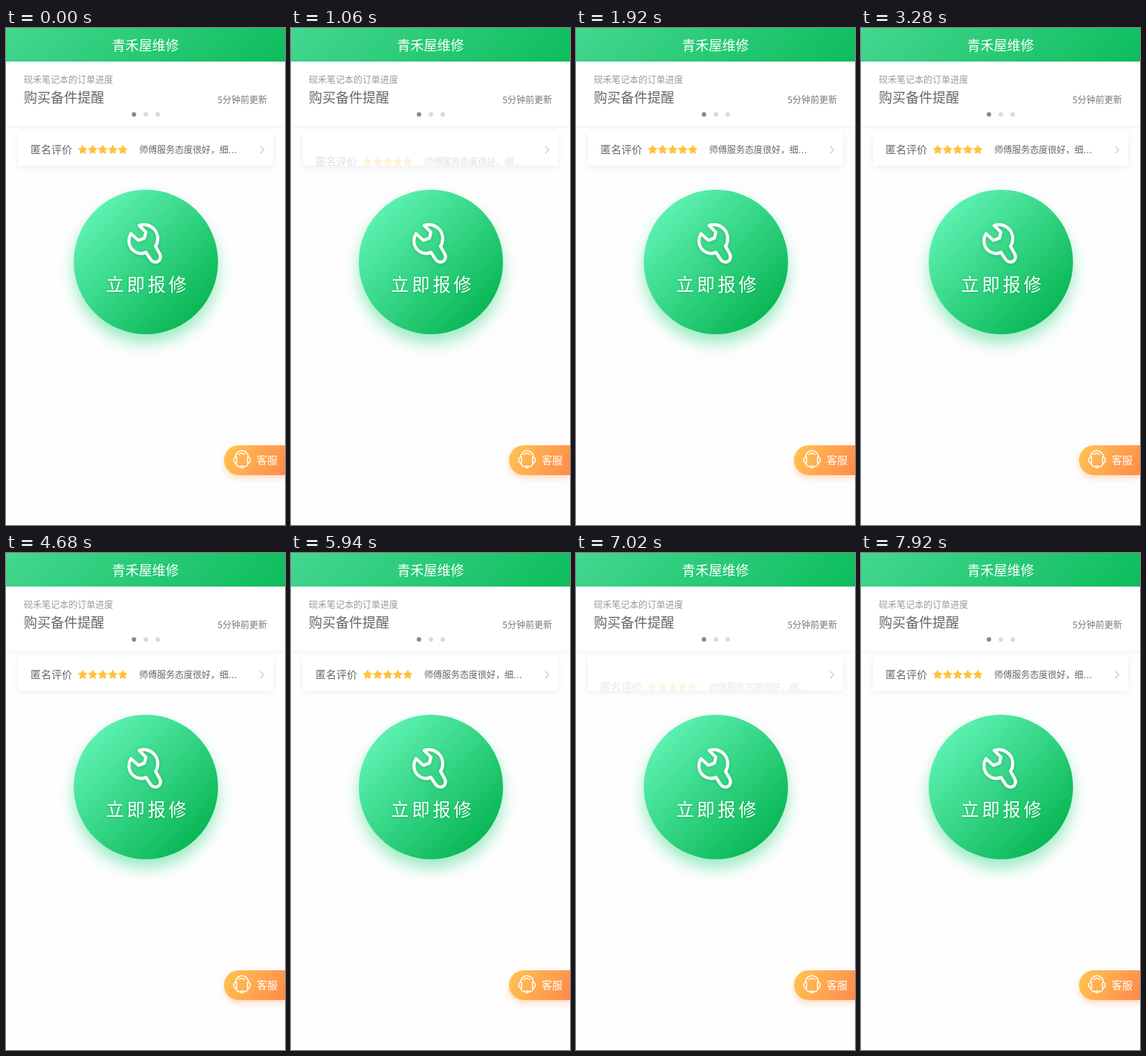
An HTML page that plays this animation: 375x667 px, repeating every 7.94 s.

```html
<!DOCTYPE html>
<html lang="zh-CN">
<head>
<meta charset="utf-8">
<style>
html, body { margin: 0; width: 100%; height: 100%; overflow: hidden; background: #fefefe; }
body { position: relative; font-family: "Noto Sans CJK SC", "Noto Sans CJK", sans-serif; }
body * { position: absolute; }
#stage { left: 0; top: 0; width: 375px; height: 667px; overflow: hidden; }
/* text is placed by the vertical centre of its glyphs */
.t { line-height: 1em; margin-top: -.556em; white-space: nowrap; }
.header { left: 0; top: 0; width: 375px; height: 45px; background: linear-gradient(135deg, #44d790, #0dbd5c); }
.title { left: 0; width: 375px; top: 22.5px; text-align: center; font-size: 18px; font-weight: 500; color: #fff; }
.order { left: 0; top: 45px; width: 375px; height: 86px; background: #fff; box-shadow: 0 1px 6px rgba(0,0,0,.07); }
.dot { top: 113px; width: 6px; height: 6px; border-radius: 50%; background: #d9d9d9; }
.dot.on { background: #888; }
.review { left: 16px; top: 138px; width: 343px; height: 47px; background: #fff; overflow: hidden; border-radius: 2px; }
.lift { left: 16px; top: 138px; width: 343px; height: 47px; border-radius: 2px; box-shadow: 0 2px 8px rgba(0,0,0,.07); }
.item { left: 0; top: 0; width: 320px; height: 47px; }
.more { position: static; letter-spacing: .7px; }
.repair { left: 91px; top: 217px; width: 194px; height: 194px; border-radius: 50%;
  background: linear-gradient(135deg, #5ff3b4 12%, #07b552 88%);
  box-shadow: 0 12px 20px rgba(60,218,140,.5); }
.call { left: 134.5px; top: 344.5px; font-size: 24px; letter-spacing: 4px; color: #fff; text-shadow: 0 1px 3px rgba(0,90,40,.25); }
.help { left: 293px; top: 560px; width: 82px; height: 40px; border-radius: 20px 0 0 20px;
  background: linear-gradient(120deg, #ffc552, #ff8a4c); box-shadow: 0 4px 8px rgba(255,150,80,.35); }
svg { left: 0; top: 0; fill: none; stroke-linecap: round; stroke-linejoin: round; }
.wrench { filter: drop-shadow(0 1px 2px rgba(0,100,50,.25)); }
</style>
</head>
<body>
<div id="stage">
  <div class="header"></div>
  <div class="t title">青禾屋维修</div>

  <div class="order"></div>
  <div class="t" style="left:24px;top:70px;font-size:12px;color:#999">砚禾笔记本的订单进度</div>
  <div class="t" style="left:24px;top:93px;font-size:18px;color:#666">购买备件提醒</div>
  <div class="t" style="right:24px;top:97px;font-size:12px;color:#777">5分钟前更新</div>
  <i class="dot on" style="left:169px"></i>
  <i class="dot" style="left:185px"></i>
  <i class="dot" style="left:201px"></i>

  <div class="lift"></div>
  <div class="review">
    <div class="item" id="item">
      <div class="t" style="left:17px;top:25px;font-size:14px;color:#666">匿名评价</div>
      <svg id="stars" width="160" height="47" fill="#ffc23d" stroke="#ffc23d"></svg>
      <div class="t" style="left:163px;top:25.5px;font-size:12px;color:#666">师傅服务态度很好，细<span class="more">...</span></div>
    </div>
    <svg width="343" height="47" stroke="#aaa" stroke-width="1"><path d="M326 21l4.5 4.5-4.5 4.5"/></svg>
  </div>

  <div class="repair"></div>
  <div class="t call">立即报修</div>

  <div class="help"></div>
  <div class="t" style="left:337px;top:580px;font-size:14px;font-weight:500;color:#fff">客服</div>

  <svg width="375" height="667" stroke="#fff">
    <path class="wrench" stroke-width="4.2" d="M179 265L188 274 186 282 178 285 168 276C163 284 165 295 173 300C178 303 184 303 188 301L194 310C197 315 203 315 206 312C208 309 208 305 206 302L201 293C205 287 205 277 200 271C195 265 187 262 179 265Z"/>
    <g stroke-width="1.5">
      <path d="M308.5 576a8.7 8.7 0 0 1 17.4 0M308.5 584c1 3 3.5 4.7 6.5 5M326 584c-1 3-3.5 4.7-6.5 5"/>
      <path d="M309.8 576v8c-5 .5-5-8.5 0-8zM324.6 576v8c5 .5 5-8.5 0-8z"/>
      <path d="M313 572.5c2.5-2.2 5.5-2.2 8 0"/>
      <circle cx="317.2" cy="589" r="1.6"/>
    </g>
  </svg>
</div>
<script>
const LOOP = 7940, ENTER = 900;
const starts = [880, 6880];

function starPath(cx, cy, r) {
  const points = [];
  for (let i = 0; i < 10; i++) {
    const a = i * Math.PI / 5 - Math.PI / 2, d = i % 2 ? r * .52 : r;
    points.push((cx + d * Math.cos(a)).toFixed(2) + ' ' + (cy + d * Math.sin(a)).toFixed(2));
  }
  return 'M' + points.join('L') + 'Z';
}

const stars = document.getElementById('stars');
stars.style.fill = '#ffc23d';
for (let i = 0; i < 5; i++) {
  const star = document.createElementNS('http://www.w3.org/2000/svg', 'path');
  star.setAttribute('d', starPath(87 + i * 13.5, 25.5, 6));
  stars.append(star);
}

// Each new review replaces the old one at once, then rises and fades in.
const pose = (time, y, opacity) => ({ offset: time / LOOP, transform: `translateY(${y}px)`, opacity });
const steps = [pose(0, 0, 1)];
for (const s of starts) steps.push(pose(s, 0, 1), pose(s, 20, 0), pose(s + ENTER, 0, 1));
steps.push(pose(LOOP, 0, 1));
document.getElementById('item').animate(steps, { duration: LOOP, iterations: Infinity });
</script>
</body>
</html>
```
